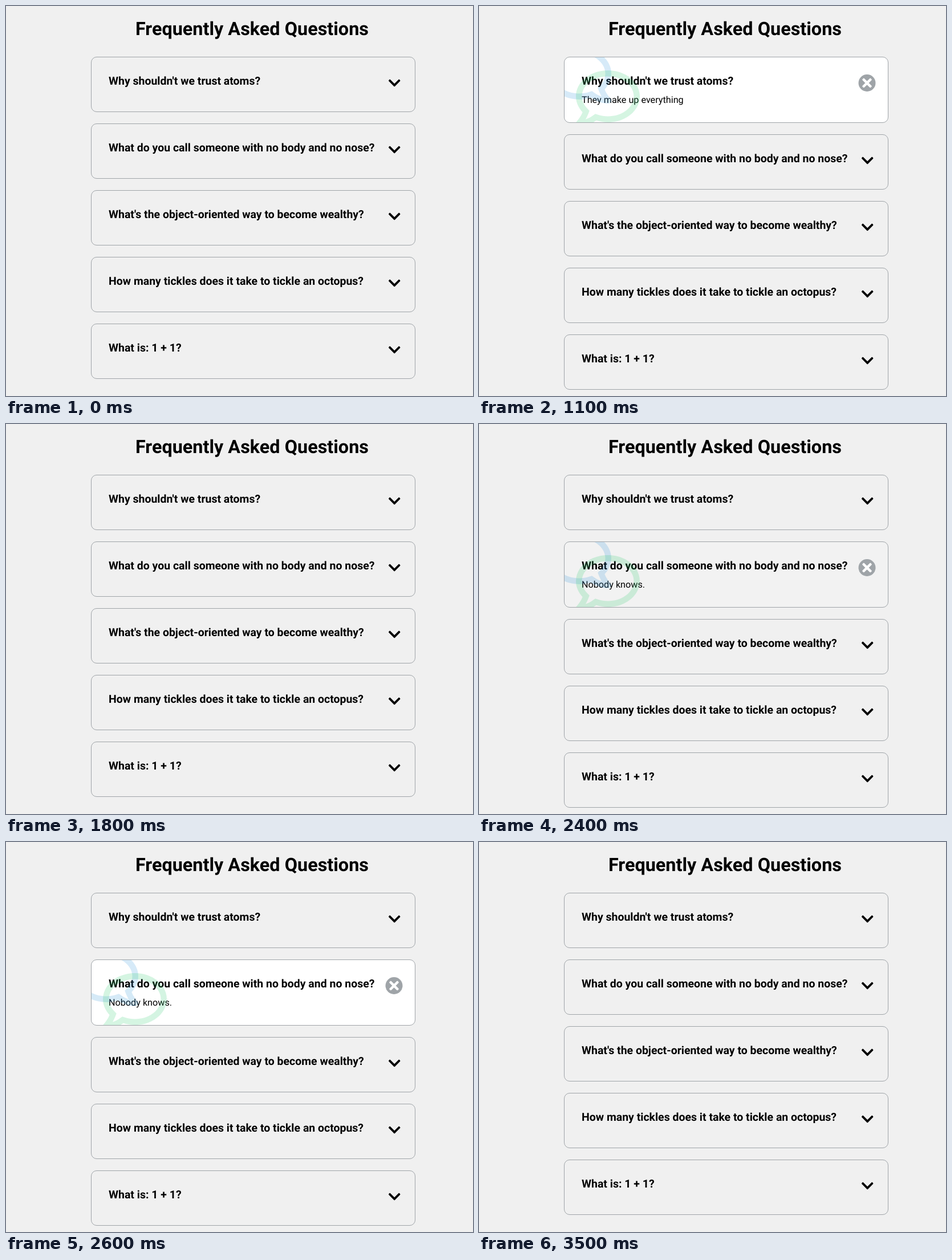
An HTML page for the animation above (4.2 s loop, 819 by 684 pixels).

```html
<!DOCTYPE html>
<html lang="en">
<head>
<meta charset="utf-8">
<title>Frequently Asked Questions</title>
<style>
  @property --open { syntax: "<number>"; inherits: true; initial-value: 0; }
  @property --glow { syntax: "<number>"; inherits: true; initial-value: 0; }

  html, body { margin: 0; width: 100%; height: 100%; overflow: hidden; }
  body {
    position: relative;
    background: #f0f0f0;
    color: #000;
    font-family: Roboto, sans-serif;
    text-rendering: geometricPrecision;
    white-space: nowrap;
  }
  h1, h3, p { margin: 0; }
  h1 { position: absolute; left: 227px; top: 21px; font-size: 32.4px; line-height: 38px; }

  main { position: absolute; left: 149px; top: 89px; width: 569px; }
  .card {
    position: relative;
    box-sizing: border-box;
    margin-bottom: 20px;
    padding: 30px;
    border: 1px solid #9fa4a8;
    border-radius: 10px;
    overflow: hidden;
    background: rgb(255 255 255 / var(--glow));
  }
  h3 { margin-bottom: 12px; font-size: 19.47px; line-height: 23px; }
  p { height: calc(19px * var(--open)); opacity: var(--open); font-size: 16.2px; line-height: 19px; }

  svg { position: absolute; display: block; }
  .toggle { left: 515px; top: 30px; width: 31px; height: 30px; }
  .bubble { width: 112px; height: 112px; opacity: calc(.2 * var(--open)); }
  .blue { left: -30px; top: -24px; fill: #3498db; transform: scaleX(-1); }
  .green { left: 20px; top: 16px; fill: #2ecc71; }
  .disc { fill: #f0f0f0; }
  .chevron { opacity: calc(1 - var(--open)); }
  .close { opacity: var(--open); }

  /* Layout flips at once while the background fades in a few steps. */
  .first { animation: first 4.2s step-end infinite; }
  .second { animation: second 4.2s step-end infinite; }
  @keyframes first {
    0%      { --open: 0; --glow: 0; }
    21.428% { --open: 1; --glow: .13; }
    23.809% { --open: 1; --glow: .78; }
    26.19%  { --open: 1; --glow: 1; }
    38.095% { --open: 0; --glow: .58; }
    40.476% { --open: 0; --glow: .11; }
    42.857%, 100% { --open: 0; --glow: 0; }
  }
  @keyframes second {
    0%      { --open: 0; --glow: 0; }
    57.142% { --open: 1; --glow: .1; }
    59.523% { --open: 1; --glow: .78; }
    61.904% { --open: 1; --glow: 1; }
    78.571% { --open: 0; --glow: .58; }
    80.952% { --open: 0; --glow: .11; }
    83.333%, 100% { --open: 0; --glow: 0; }
  }
</style>
</head>
<body>
<svg width="0" height="0">
  <defs>
    <path id="chevron" transform="translate(5.7 3) scale(.046875)" d="M207 381.500L12.700 187.100c-9.400-9.400-9.400-24.600 0-33.900l22.700-22.700c9.400-9.400 24.500-9.400 33.900 0L224 284.500l154.700-154c9.400-9.300 24.500-9.300 33.900 0l22.700 22.700c9.400 9.400 9.400 24.600 0 33.900L241 381.500c-9.400 9.400-24.600 9.400-34 0z"/>
    <path id="cross" transform="translate(7.25 3) scale(.046875)" d="M242.700 256l100.100-100.100c12.300-12.300 12.300-32.200 0-44.500l-22.200-22.200c-12.300-12.300-32.200-12.300-44.500 0L176 189.300 75.900 89.200c-12.300-12.300-32.200-12.300-44.500 0L9.200 111.400c-12.300 12.300-12.300 32.200 0 44.500L109.300 256 9.200 356.100c-12.300 12.300-12.300 32.200 0 44.500l22.200 22.200c12.300 12.300 32.200 12.300 44.500 0L176 322.700l100.100 100.100c12.300 12.300 32.200 12.300 44.500 0l22.200-22.200c12.300-12.300 12.300-32.200 0-44.500z"/>
    <path id="bubble" transform="scale(.21875)" d="M256 32C114.600 32 0 125.100 0 240c0 47.600 19.900 91.200 52.900 126.300C38 405.700 7 439.100 6.500 439.500c-6.600 7-8.400 17.200-4.600 26S14.400 480 24 480c61.500 0 110-25.700 139.100-46.300C192 442.800 223.200 448 256 448c141.400 0 256-93.100 256-208S397.400 32 256 32zm0 368c-26.700 0-53.100-4.100-78.400-12.100l-22.700-7.200-19.500 13.800c-14.300 10.100-33.900 21.400-57.500 29 7.300-12.100 14.400-25.700 19.900-40.200l10.600-28.100-20.600-21.800C69.700 314.100 48 282.200 48 240c0-88.200 93.300-160 208-160s208 71.800 208 160-93.300 160-208 160z"/>
    <g id="close">
      <circle cx="15.500" cy="15" r="15" fill="#9fa4a8"/>
      <use href="#cross" fill="#fff"/>
    </g>
  </defs>
</svg>

<h1>Frequently Asked Questions</h1>
<main>
  <section class="card first">
    <h3>Why shouldn't we trust atoms?</h3>
    <p>They make up everything</p>
    <svg class="bubble blue"><use href="#bubble"/></svg>
    <svg class="bubble green"><use href="#bubble"/></svg>
    <svg class="toggle">
      <circle class="disc" cx="15.500" cy="15" r="14"/>
      <use class="chevron" href="#chevron"/>
      <use class="close" href="#close"/>
    </svg>
  </section>
  <section class="card second">
    <h3>What do you call someone with no body and no nose?</h3>
    <p>Nobody knows.</p>
    <svg class="bubble blue"><use href="#bubble"/></svg>
    <svg class="bubble green"><use href="#bubble"/></svg>
    <svg class="toggle">
      <circle class="disc" cx="15.500" cy="15" r="14"/>
      <use class="chevron" href="#chevron"/>
      <use class="close" href="#close"/>
    </svg>
  </section>
  <section class="card">
    <h3>What's the object-oriented way to become wealthy?</h3>
    <svg class="toggle"><use href="#chevron"/></svg>
  </section>
  <section class="card">
    <h3>How many tickles does it take to tickle an octopus?</h3>
    <svg class="toggle"><use href="#chevron"/></svg>
  </section>
  <section class="card">
    <h3>What is: 1 + 1?</h3>
    <svg class="toggle"><use href="#chevron"/></svg>
  </section>
</main>
</body>
</html>
```
